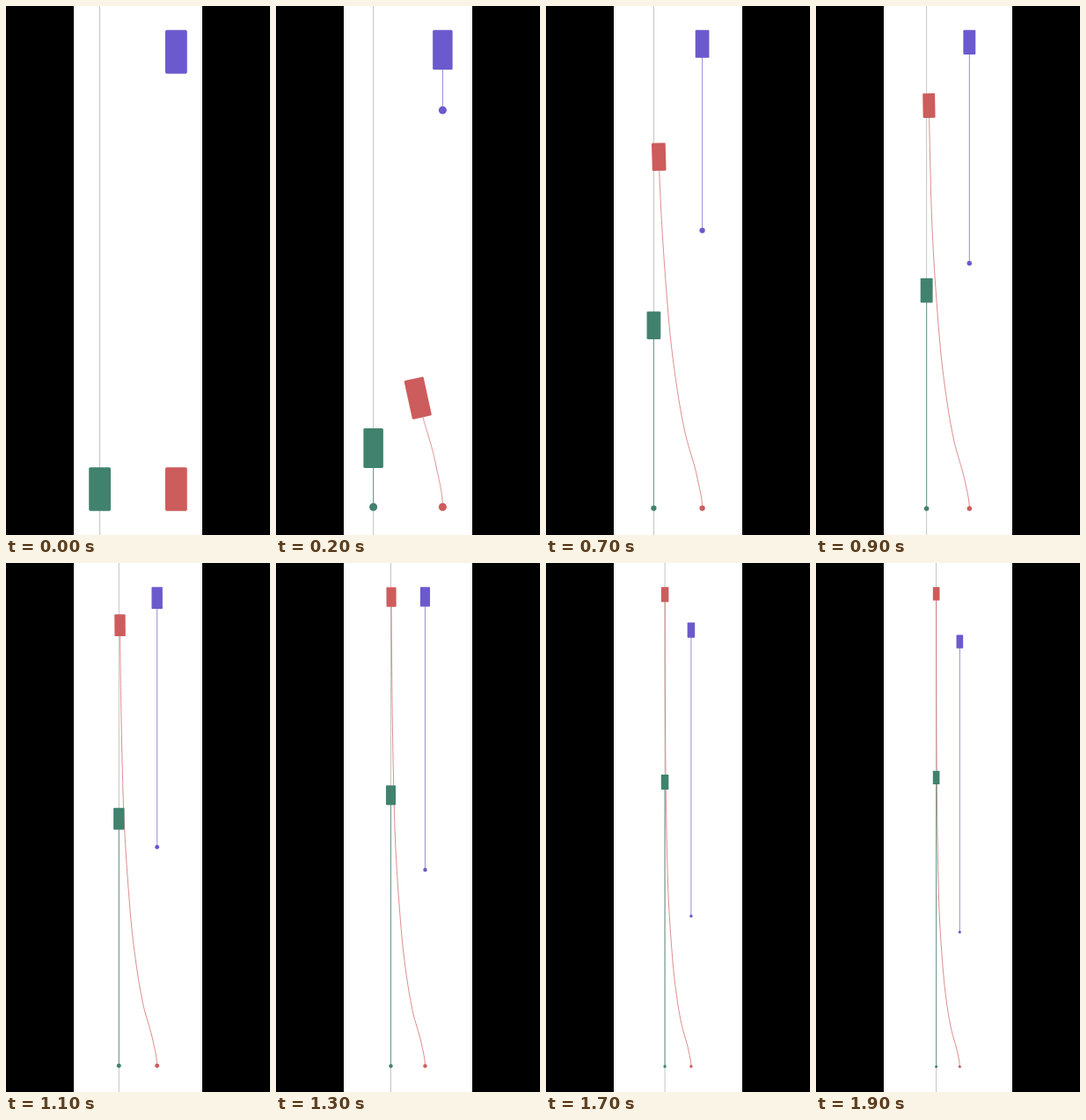
Animation of 300x600 px, one loop 2000 ms. Source, as an HTML page with a canvas:

```html
<!DOCTYPE html>
<html lang="en">
<head>
<meta charset="utf-8">
<title>Lane change</title>
<style>
  html, body { margin: 0; width: 100%; height: 100%; overflow: hidden; background: #000; }
  canvas { display: block; }
</style>
</head>
<body>
<canvas id="stage" width="300" height="600"></canvas>
<script>
const ctx = document.getElementById('stage').getContext('2d');
const W = 300, H = 600, STEP = 100, STEPS = 20;
const LANE = 1.75, CAR_W = 1, CAR_L = 2, DOT = 0.2, LEAD = 20;
const FIT = H / 1.1;
const PURPLE = '#6a5acd', RED = '#cd5c5c', GREEN = '#40826d';

// Monotone cubic through [x, y] points; returns value and slope.
function spline(points, startSlope) {
  const n = points.length - 1;
  const h = [], d = [], m = [];
  for (let i = 0; i < n; i++) {
    h[i] = points[i + 1][0] - points[i][0];
    d[i] = (points[i + 1][1] - points[i][1]) / h[i];
  }
  m[0] = startSlope ?? ((2 * h[0] + h[1]) * d[0] - h[0] * d[1]) / (h[0] + h[1]);
  m[n] = d[n - 1];
  for (let i = 1; i < n; i++) {
    const a = 2 * h[i] + h[i - 1], b = h[i] + 2 * h[i - 1];
    m[i] = (a + b) / (a / d[i - 1] + b / d[i]);
  }
  return x => {
    let i = 0;
    while (i < n - 1 && x > points[i + 1][0]) i++;
    const u = (x - points[i][0]) / h[i], v = 1 - u;
    const value = points[i][1] * v * v * (1 + 2 * u) + points[i + 1][1] * u * u * (3 - 2 * u)
      + h[i] * (m[i] * u * v * v - m[i + 1] * u * u * v);
    const slope = 6 * u * v * d[i] + m[i] * v * (1 - 3 * u) + m[i + 1] * u * (3 * u - 2);
    return { value, slope };
  };
}

// Distance travelled by each car at a given step.
const keys = [0, 2, 4, 7, 11, 15, 19];
const travel = list => spline(list.map((y, i) => [keys[i], y]));
const purpleRun = travel([0, 3.04, 6.86, 13.43, 22.8, 32.95, 43.2]);
const greenRun = travel([0, 2.97, 6.67, 13.17, 22.6, 32.72, 42.98]);
const redRun = travel([0, 5.49, 13.38, 25.3, 40.3, 55.3, 70.3]);

// Sideways shift of the red car against distance travelled.
const shift = spline([
  [0, 0], [2.2, 0.36], [5.49, 1.25], [8.25, 1.76], [13.38, 2.4],
  [25.3, 3.13], [40.3, 3.4], [55, 3.48], [75, 3.5]
], 0);

function draw(step) {
  const purple = purpleRun(step).value;
  const green = greenRun(step).value;
  const red = redRun(step).value;

  const top = Math.max(LEAD + purple, red) + CAR_L / 2;
  const bottom = Math.min(-DOT, green - CAR_L / 2);
  const scale = FIT / (top - bottom);
  const px = x => W / 2 + x * scale;
  const py = y => (H - FIT) / 2 + (top - y) * scale;

  function path(color, width, points) {
    ctx.strokeStyle = color;
    ctx.lineWidth = width;
    ctx.beginPath();
    for (const [x, y] of points) ctx.lineTo(px(x), py(y));
    ctx.stroke();
  }

  function dot(color, x, y) {
    ctx.fillStyle = color;
    ctx.beginPath();
    ctx.arc(px(x), py(y), DOT * scale, 0, 2 * Math.PI);
    ctx.fill();
  }

  function car(color, x, y, angle = 0) {
    ctx.save();
    ctx.translate(px(x), py(y));
    ctx.rotate(angle);
    ctx.scale(scale, scale);
    ctx.fillStyle = color;
    ctx.beginPath();
    ctx.roundRect(-CAR_W / 2, -CAR_L / 2, CAR_W, CAR_L, 0.07);
    ctx.fill();
    ctx.restore();
  }

  function straight(color, x, from, to) {
    path(color, 0.7, [[x, from], [x, to]]);
    dot(color, x, from);
    car(color, x, to);
  }

  ctx.fillStyle = '#000';
  ctx.fillRect(0, 0, W, H);
  ctx.fillStyle = '#fff';
  ctx.fillRect(77, 0, 146, H);

  ctx.fillStyle = '#bebebe';
  ctx.fillRect(px(-LANE) - 0.45, 0, 0.9, H);

  straight(PURPLE, LANE, LEAD, LEAD + purple);

  const trail = [];
  for (let i = 0; i <= 120; i++) {
    const y = red * i / 120;
    trail.push([LANE - shift(y).value, y]);
  }
  path(RED, 0.7, trail);
  dot(RED, LANE, 0);
  const pose = shift(red);
  car(RED, LANE - pose.value, red, -Math.atan(pose.slope));

  straight(GREEN, -LANE, 0, green);
}

const start = performance.now();
function tick() {
  const elapsed = performance.now() - start;
  draw(Math.floor(elapsed / STEP) % STEPS);
  requestAnimationFrame(tick);
}
tick();
</script>
</body>
</html>
```
